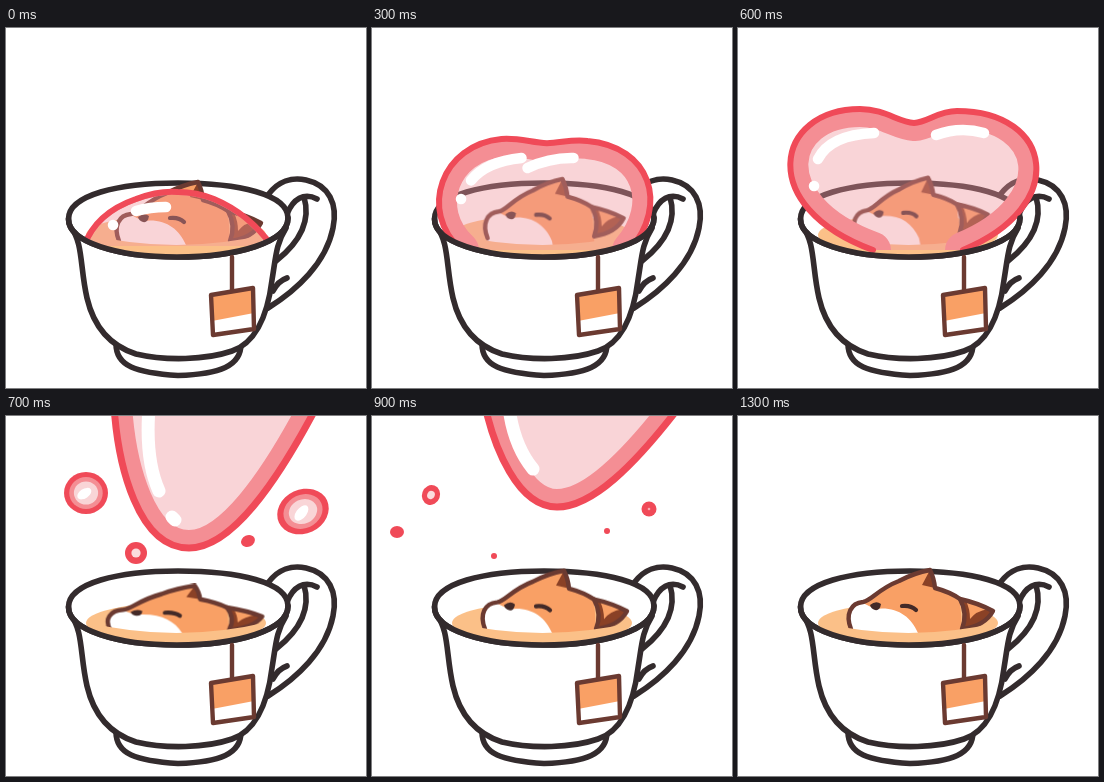
These frames come from a looping animation (360x360 px, 1.5 s). An HTML page without scripts:

```html
<!DOCTYPE html>
<html lang="en">
<head>
<meta charset="utf-8">
<title>Fox in a teacup</title>
<style>
  html, body { margin: 0; width: 100%; height: 100%; overflow: hidden; background: #fff; }
  svg { display: block; width: 100vw; height: 100vh; }
  path, line { stroke-linecap: round; stroke-linejoin: round; }
  .ink { fill: none; stroke: #332b2d; stroke-width: 5.6; }
  .white { fill: #fff; }
  .brown { stroke: #6b3a31; stroke-width: 4.4; }

  .fox { transform-origin: 180px 217px; animation: bob 1.5s step-end infinite; }
  .fox * { vector-effect: non-scaling-stroke; }
  @keyframes bob {
    0%     { transform: none; }
    13.33% { transform: translateY(-1px) scale(.98, 1); }
    20%    { transform: translateY(-4px) rotate(-1deg) scale(.96, .98); }
    26.66% { transform: translate(1px, -7px) rotate(-2deg) scale(.93, .95); }
    46.66% { transform: translateX(-4px) scale(1.07, .75); }
    53.33% { transform: translateX(-2px) scale(1.04, .88); }
    60%    { transform: scale(1, .99); }
    66.66% { transform: scale(1, 1.01); }
    73.33% { transform: none; }
    80%    { transform: scale(1.01, .99); }
    86.66%, 100% { transform: none; }
  }

  /* Bubble layers: steps(2) adds one in-between pose per segment */
  .tint { fill: #f0949b; fill-opacity: .4; }
  .band { fill: none; stroke: #f48e94; stroke-width: 36; }
  .line { fill: none; stroke: #f04a58; stroke-width: 6; }
  .shine { fill: none; stroke: #fff; stroke-width: 10.5; }

  .inflate { animation: stay 1.5s step-end infinite; }
  .float { animation: leave 1.5s step-end infinite; }
  @keyframes stay { 0% { visibility: visible; } 46.66%, 100% { visibility: hidden; } }
  @keyframes leave { 0%, 79.99%, 100% { visibility: hidden; } 46.66% { visibility: visible; } }

  .grow { animation: grow 1.5s steps(2) infinite; }
  .grow.band { animation: grow 1.5s steps(2) infinite, thicken 1.5s steps(2) infinite; }
  @keyframes thicken { 0% { stroke-width: 6; } 13.33%, 100% { stroke-width: 36; } }
  @keyframes grow {
    0%     { d: path("M78,218C86,196 104,180 130,171C146,165 160,163 172,164C186,164 198,167 208,171C232,181 250,196 266,218"); }
    13.33% { d: path("M78,222C70,175 95,138 135,127C147,124 160,123.5 175,123.5C190,123.5 203,125 216,129C252,140 272,168 266,222"); }
    26.66% { d: path("M100,222C22,190 44,95 124,95C146,95 160,106 175,107C189,106 198,97 215,97C305,97 322,185 250,222"); }
    40%, 100% { d: path("M135,222C16,178 38,81 122,81C147,81 160,94 176,95C190,94 200,83 219,83C315,83 332,178 225,222"); }
  }
  .glint { animation: glint 1.5s steps(2) infinite; }
  @keyframes glint {
    0%     { d: path("M130,183Q144,179 160,179M130,183Q144,179 160,179M107,197L107.1,197"); }
    13.33% { d: path("M116,160Q135,146 163,141M116,160Q135,146 163,141M101,172L101.1,172"); }
    26.66% { d: path("M82,145Q93,121 136,119M195,120Q220,113 240,119M77,170L77.1,170"); }
    40%, 100% { d: path("M80,131Q92,107 136,105M198,107Q222,98 246,105M76,158L76.1,158"); }
  }

  .rise { animation: rise 1.5s steps(2) infinite; }
  .float .line { stroke-width: 7; }
  @keyframes rise {
    0%, 46.66% { d: path("M108,-10C112,50 132,132 183,132C225,132 270,68 311,-10"); }
    60%        { d: path("M113,-10C122,30 145,91 185,91C220,91 262,50 308,-10"); }
    73.33%, 100% { d: path("M135,-16C148,0 164,19 186,19C200,19 240,6 300,-8"); }
  }
  .streak { stroke-width: 13; animation: streak 1.5s steps(2) infinite; }
  @keyframes streak {
    0%, 46.66% { d: path("M143,-8Q139,44 153,75M166,101L169,104"); }
    60%        { d: path("M137,-8Q142,30 161,53M161,53L161,53.1"); }
    73.33%, 100% { d: path("M137,-60Q142,-30 161,-20M161,-20L161,-20.1"); }
  }

  .spray { fill: #f04a58; visibility: hidden; animation: flash 1.5s step-end calc(var(--t) - 1500ms) infinite; }
  @keyframes flash { 0% { visibility: visible; } 6.66%, 100% { visibility: hidden; } }
</style>
</head>
<body>
<svg viewBox="0 0 360 360">
  <defs>
    <clipPath id="above"><path d="M0,0H360V198H281C270,219 222,229 171,229C120,229 74,219 62,198H0Z"/></clipPath>
    <clipPath id="afloat"><path d="M0,0H360V206H262Q170,228 80,206H0Z"/></clipPath>
    <clipPath id="growing"><path class="grow"/></clipPath>
    <clipPath id="rising"><path class="rise"/></clipPath>
    <g id="drop">
      <circle r="10"/>
      <circle r="7.6" fill="#f48e94"/>
      <circle r="5.5" fill="#f9d5d7"/>
      <ellipse cx="-.8" cy="-.2" rx="3.6" ry="2.2" fill="#fff" transform="rotate(-35)"/>
    </g>
    <g id="ring"><circle r="10"/><circle r="4.2" fill="#fbdcde"/></g>
  </defs>

  <!-- Handle, foot and bowl -->
  <g class="ink">
    <path d="M262,167C272,153 286,149 300,152C323,157 332,176 327,200C320,235 291,262 262,280"/>
    <path d="M281,186C287,171 298,164 311,171M298,169C306,196 289,218 270,233M267,263Q272,253 281,250"/>
    <path class="white" d="M110,316C110,338 130,345 172,347.5C214,346 235,338 235,316"/>
    <path class="white" d="M65,200C77,214 74,240 81,270C88,300 105,318 130,326C160,333 200,332 226,323C252,314 262,284 266,252C270,228 270,216 280,200"/>
    <path class="white" d="M62.5,191C62.5,167 112,155 172,155C232,155 282,166 282,190C282,214 232,229 171,229C111,229 62.5,214 62.5,191Z"/>
  </g>
  <ellipse cx="170" cy="207" rx="90" ry="20" fill="#fbc088"/>

  <g clip-path="url(#afloat)">
    <g class="fox">
      <path fill="#f9a065" d="M116,235L112,212C107,198 113,187 125,186C133,185 140,173 161,165L192,154L197,172Q212,176 222,183L224,213V235Z"/>
      <path class="white" d="M116,235L112,212C108,199 113,189 125,187L137,193C158,190 173,200 180,217L183,235Z"/>
      <path fill="#8a4126" d="M192,154L197,172L184,169Z"/>
      <path fill="#8a4126" d="M222,183Q240,187 255,195Q247,210 224,213Q230,198 222,183Z"/>
      <path fill="#f9a065" d="M228,185L250,193Q238,195 232,203Q232,193 228,185Z"/>
      <g class="brown" fill="none">
        <path d="M113,213C107,198 113,187 125,186C133,185 140,173 161,165Q176,157 192,154Q196,162 197,172Q212,176 222,183"/>
        <path d="M222,183Q240,187 255,195Q247,210 224,213Q230,198 222,183"/>
      </g>
      <path fill="#432a28" d="M132,189Q138,184 143,188Q142,195 137,194Q133,193 132,189Z"/>
      <path fill="none" stroke="#432a28" stroke-width="4.2" d="M164,190Q173,189 178,194"/>
    </g>
  </g>

  <g clip-path="url(#above)">
    <g class="inflate">
      <path class="grow tint"/>
      <g clip-path="url(#growing)"><path class="grow band"/></g>
      <path class="grow line"/>
      <path class="glint shine"/>
    </g>
  </g>

  <path class="ink" d="M62.5,191C62.5,214 111,229 171,229C232,229 282,214 282,190"/>

  <!-- Tea tag -->
  <line class="brown" x1="226" y1="229" x2="226" y2="262"/>
  <path fill="#f9a065" d="M205,267L247,260L248,302L207,307Z"/>
  <path class="white" d="M206,293L248,285V302L207,307Z"/>
  <path class="brown" fill="none" d="M205,267L247,260L248,301L207,307Z"/>

  <g class="float">
    <path class="rise tint"/>
    <g clip-path="url(#rising)"><path class="rise band"/></g>
    <path class="rise line"/>
    <path class="streak shine"/>
  </g>

  <g class="spray" style="--t:699ms">
    <use href="#drop" transform="translate(80 77) scale(2.2 2.1)"/>
    <use href="#drop" transform="translate(297 95.5) rotate(-25) scale(2.65 2.2)"/>
    <use href="#ring" transform="translate(130 137) scale(1.1)"/>
    <ellipse cx="242" cy="125" rx="7.2" ry="5.8" transform="rotate(-25 242 125)"/>
  </g>
  <g class="spray" style="--t:799ms">
    <use href="#drop" transform="translate(64 77) scale(1.4)"/>
    <use href="#drop" transform="translate(284 94) scale(1.3)"/>
    <use href="#ring" transform="translate(25 112)"/>
    <use href="#ring" transform="translate(337 108)"/>
    <circle cx="125" cy="139" r="6"/>
    <circle cx="238" cy="119" r="5"/>
  </g>
  <g class="spray" style="--t:899ms">
    <use href="#ring" transform="translate(59 79) rotate(20) scale(.9 1)"/>
    <circle cx="277" cy="93" r="7.5"/>
    <circle cx="277" cy="93" r="1.3" fill="#f9a9af"/>
    <ellipse cx="25" cy="116" rx="7" ry="6"/>
    <circle cx="122" cy="140" r="3"/>
    <circle cx="235" cy="115" r="3"/>
  </g>
</svg>
</body>
</html>
```
